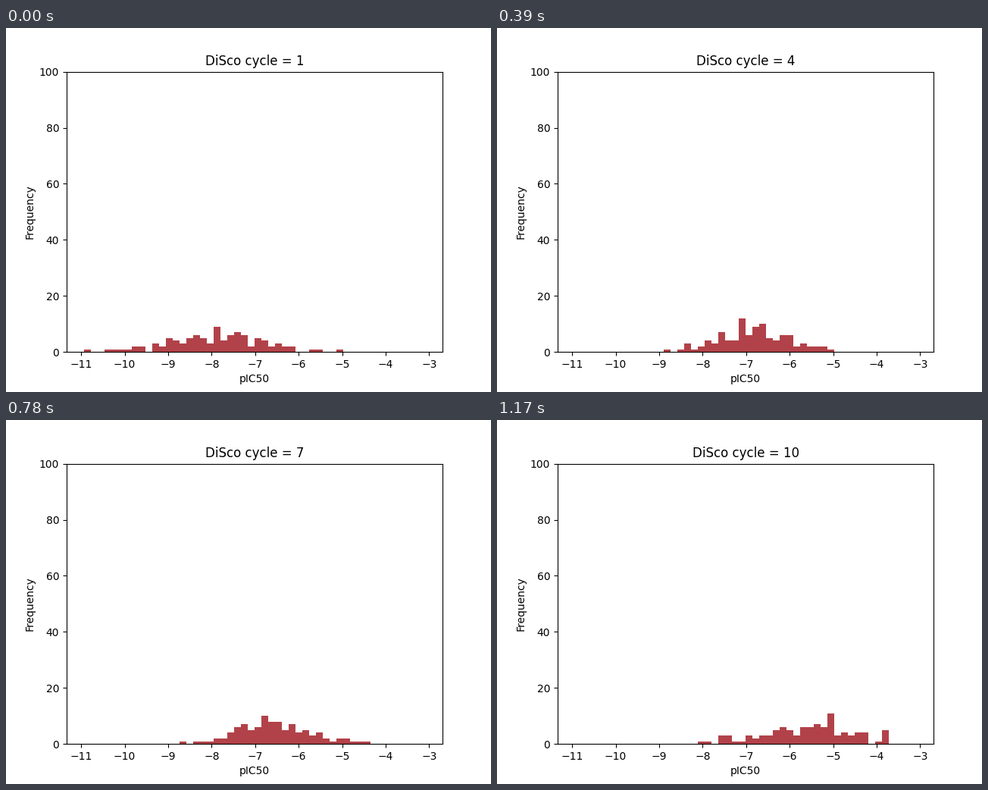
Recreate the animation shown at these times as a matplotlib script. Size 640 px wide and 480 px high, loop 1.3 s.

```python
import numpy as np
import matplotlib.pyplot as plt
from matplotlib.animation import FuncAnimation

BINS = 50
SAMPLES = 100
LOW, HIGH = -10.9405, -3.086
CYCLES = 10
STEP_MS = 130

# Minimum, 5 %, median, 95 % and maximum of the samples, in bins.
LEVELS = np.array([0.005, 0.05, 0.5, 0.95, 0.995])
KEYS = {
    1: (0, 6.5, 19.7, 30.5, 38),
    3: (14, 16.3, 24.9, 34.8, 37),
    5: (13, 18, 27.2, 35.7, 39),
    6: (16, 19.1, 26.2, 37, 42),
    8: (12, 19.3, 29, 38.5, 42),
    9: (14, 19.5, 33.6, 42.2, 50),
    10: (18, 21.3, 34.9, 44.8, 46),
}


def logit(p):
    return np.log(p / (1 - p))


def histogram(cycle):
    """Bin counts of seeded samples that follow the key quantiles."""
    rng = np.random.default_rng(cycle)
    points = [np.interp(cycle, list(KEYS), track)
              for track in zip(*KEYS.values())]
    p = (np.arange(SAMPLES) + rng.uniform(0.2, 0.8, SAMPLES)) / SAMPLES
    x = np.interp(logit(p), logit(LEVELS), points)
    x += rng.normal(0, 0.5, SAMPLES)
    x = np.clip(x, points[0], points[-1] - 0.01)
    return np.histogram(x, bins=BINS, range=(0, BINS))[0]


fig, ax = plt.subplots(figsize=(6.4, 4.8), dpi=100)
edges = np.linspace(LOW, HIGH, BINS + 1)
bars = ax.bar(edges[:-1], np.zeros(BINS), width=np.diff(edges),
              align="edge", color="#b24249")
margin = 0.05 * (HIGH - LOW)
ax.set_xlim(LOW - margin, HIGH + margin)
ax.set_ylim(0, 100)
ax.set_xticks(range(-11, -2))
ax.set_xlabel("pIC50")
ax.set_ylabel("Frequency")
title = ax.set_title("")


def draw(i):
    cycle = i + 1
    for bar, count in zip(bars, histogram(cycle)):
        bar.set_height(count)
    title.set_text(f"DiSco cycle = {cycle}")
    return [*bars, title]


anim = FuncAnimation(fig, draw, frames=CYCLES, init_func=lambda: draw(0),
                     interval=STEP_MS, repeat=True, repeat_delay=0)
plt.show()
```
